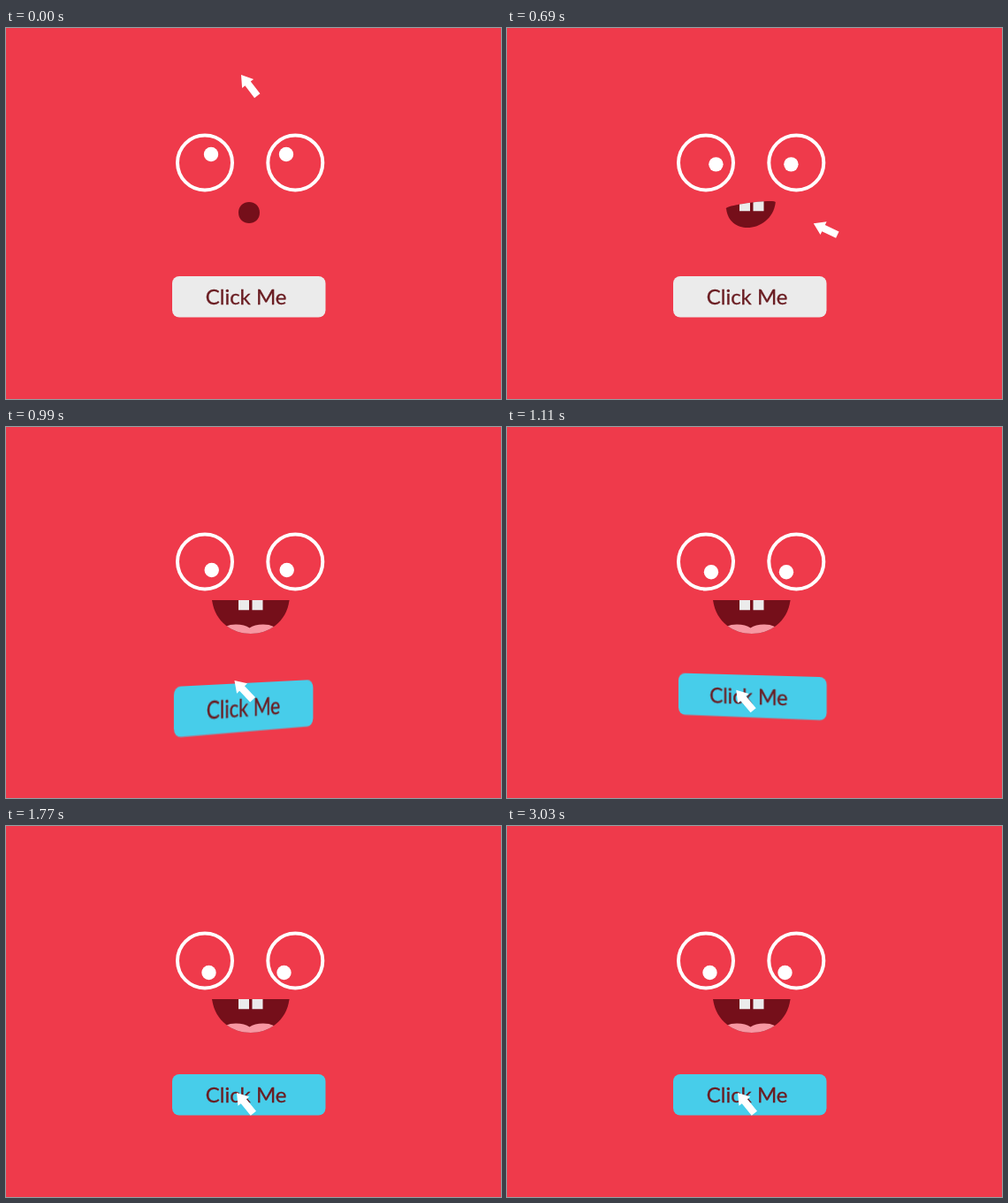
These frames come from a looping animation (560x420 px, 3090 ms). An HTML page:

```html
<!DOCTYPE html>
<html lang="en">
<head>
<meta charset="utf-8">
<title>Click Me</title>
<style>
  html, body { margin: 0; width: 100%; height: 100%; overflow: hidden; background: #ef3a4b; }
  #stage { position: fixed; inset: 0; overflow: hidden; contain: strict; }
  svg { position: absolute; left: 0; top: 0; width: 560px; height: 420px; }
  #button { left: 188.3px; top: 281px; width: 173.5px; height: 46.5px; }
  text { font: 24px Lato, "Open Sans", sans-serif; fill: #6a1d22; stroke: #6a1d22; stroke-width: .3; }
</style>
</head>
<body>
<div id="stage">
  <svg viewBox="0 0 560 420">
    <clipPath id="mouthClip"><path id="mouthEdge"/></clipPath>
    <g fill="none" stroke="#fff" stroke-width="4">
      <circle cx="225" cy="152.5" r="31"/>
      <circle cx="327.3" cy="152.5" r="31"/>
    </g>
    <g id="pupils" fill="#fff">
      <circle cx="-42.5" r="8.2"/>
      <circle cx="42.5" r="8.2"/>
    </g>
    <path id="mouth" fill="#750f1a"/>
    <g clip-path="url(#mouthClip)">
      <path id="tongue" fill="#f797a2" d="M243 232Q246 223.500 260 223.500Q270 223.500 275.500 227.500Q281 223.500 291 223.500Q305 223.500 308 232L300 240H250Z"/>
      <path id="teeth" fill="#ebebeb" d="M263 195h12v12.300h-12zM278.500 195h12v12.300h-12z"/>
    </g>
  </svg>
  <svg id="button" viewBox="0 0 173.5 46.5">
    <rect id="plate" width="173.5" height="46.5" rx="8"/>
    <text x="37.7" y="32.2">Click Me</text>
  </svg>
  <svg viewBox="0 0 560 420">
    <path id="cursor" fill="#fff" d="M0 0L8.200 12.500H4V30H-4V12.500H-8.200Z"/>
  </svg>
</div>
<script>
const LOOP = 3090, STEP = 30, HOVER = 780, REST = 1320;
const el = id => document.getElementById(id);
const progress = (t, from, to) => Math.min(1, Math.max(0, (t - from) / (to - from)));
const mix = (a, b, u) => a + (b - a) * u;
const smooth = u => u * u * (3 - 2 * u);
const easeOut = (u, power) => 1 - (1 - u) ** power;
const pulse = (u, rise, fall) => u ** rise * (1 - u) ** fall;
const bezier = (p, u) => p[0].map((_, i) =>
  p[0][i] * (1 - u) ** 3 + 3 * p[1][i] * u * (1 - u) ** 2 +
  3 * p[2][i] * u * u * (1 - u) + p[3][i] * u ** 3);

// Cursor points are x, y, angle
const cursorSweep = [[266, 53, -37.5], [580, 50, -56], [615, 190, -70], [350, 216, -65]];
const cursorDive = [[350, 216, -65], [330, 255, -60], [241, 261, -50], [261, 302, -39]];
const gazeSweep = [[274.5, 143], [290, 143], [286, 152], [279, 154]];
const gazeDive = [[279, 154], [278, 158], [277, 160], [272, 166]];

function drawCursorAndGaze(t) {
  const sweep = smooth(progress(t, 0, 540)), dive = progress(t, 680, REST);
  const [x, y, angle] = dive ? bezier(cursorDive, easeOut(dive, 3)) : bezier(cursorSweep, sweep);
  const gaze = dive ? bezier(gazeDive, easeOut(dive, 2)) : bezier(gazeSweep, sweep);
  el('cursor').setAttribute('transform', `translate(${x} ${y}) rotate(${angle})`);
  el('pupils').setAttribute('transform', `translate(${gaze})`);
}

// A small round mouth widens, lopsided halfway, into a grin
function drawMouth(t) {
  const open = smooth(progress(t, 570, 810));
  const centre = mix(275, 276.8, open), half = mix(12, 43.8, open);
  const left = centre - half, right = centre + half, inset = 7 * open;
  const corner = mix(209, 196, open ** .65), tilt = 14 * open * (1 - open);
  const leftY = corner + tilt, rightY = corner - tilt;
  const arch = 16 * (1 - open) ** 2, depth = mix(16, 50.7, open);
  const path = `M${left} ${leftY}C${left} ${leftY - arch} ${right} ${rightY - arch} ${right} ${rightY}` +
    `C${right - inset} ${rightY + depth} ${left + inset} ${leftY + depth} ${left} ${leftY}Z`;
  el('mouth').setAttribute('d', path);
  el('mouthEdge').setAttribute('d', path);
  el('teeth').style.visibility = open ? 'visible' : 'hidden';
  el('tongue').setAttribute('transform', `translate(0 ${14 * (1 - open)})`);
}

// The button drops, swells and swings until it settles
function drawButton(t) {
  const u = progress(t, HOVER, REST);
  const swing = -357 * pulse(u, 1, 2.5) * Math.sin(4 * Math.PI * u);
  const drop = 1720 * pulse(u, 1, 8), scale = 1 + 23 * pulse(u, 2, 6);
  el('button').style.transform = u % 1 === 0 ? 'none'
    : `translate(${-.06 * swing}px, ${drop}px) perspective(1400px) skewY(${-.095 * swing}deg) rotateY(${swing}deg) scale(${scale})`;
  el('plate').setAttribute('fill', t < HOVER ? '#ebebeb' : '#47cdea');
}

const start = performance.now();
function tick() {
  const elapsed = (performance.now() - start) % LOOP;
  const t = Math.floor(elapsed / STEP) * STEP;
  drawCursorAndGaze(t);
  drawMouth(t);
  drawButton(t);
  requestAnimationFrame(tick);
}
tick();
</script>
</body>
</html>
```
